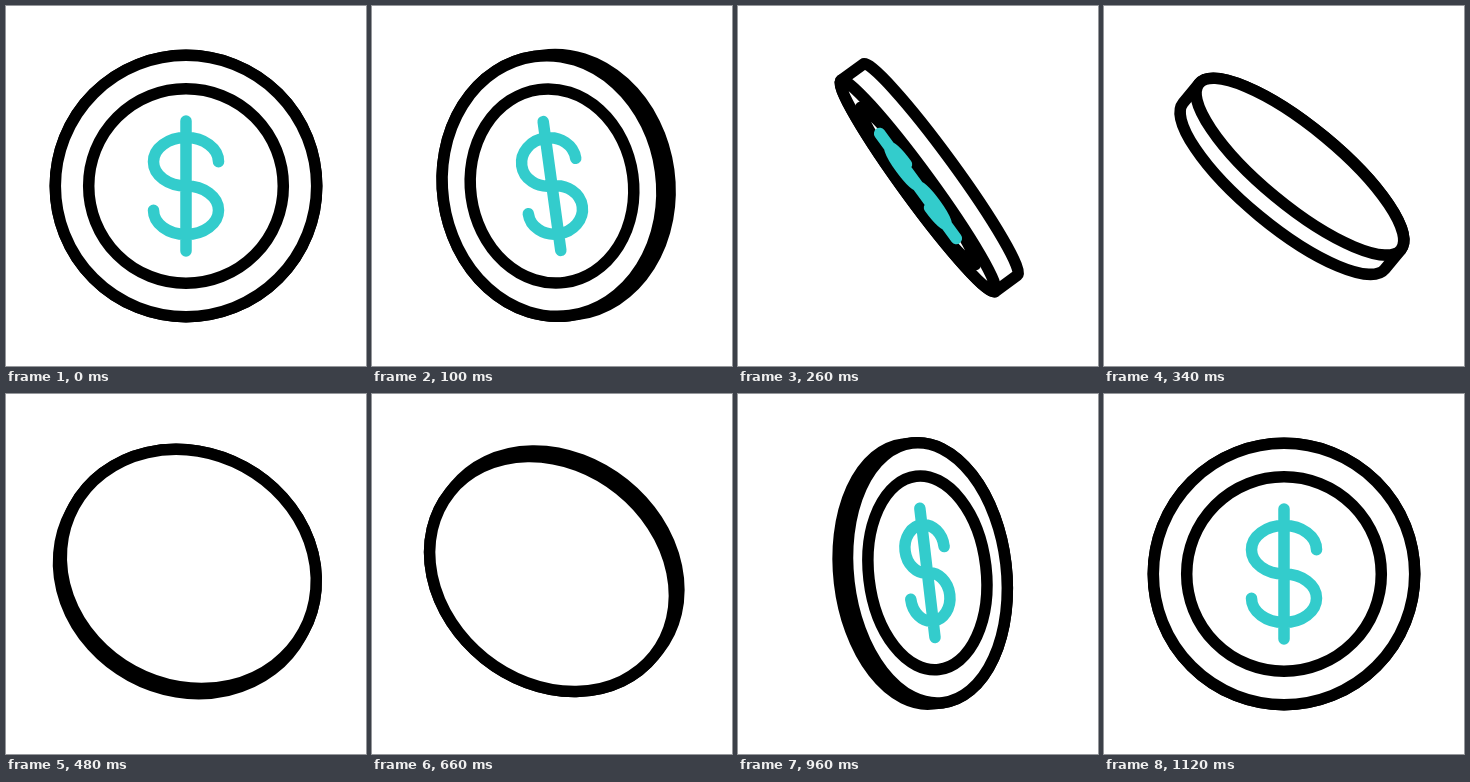
An HTML page with a canvas for the animation above (1400 ms loop, 360 px wide and 360 px high).

```html
<!DOCTYPE html>
<html lang="en">
<head>
<meta charset="utf-8">
<title>Spinning coin</title>
<style>
html, body { margin: 0; width: 100%; height: 100%; overflow: hidden; background: #fff; }
canvas { display: block; width: 360px; height: 360px; }
</style>
</head>
<body>
<canvas id="stage" width="360" height="360"></canvas>
<script>
const ctx = document.getElementById('stage').getContext('2d');
const LOOP = 1400, SPIN = 1120, STEP = 20;
const RIM = 130.7, RING = 97.3, HALF_TURN = Math.PI, QUARTER = Math.PI / 2;

// time (ms), spin correction (deg), tilt (deg), visible edge (px)
const keys = [
  [0, 0, 0, 0],
  [180, 1.4, 20.4, 18.5],
  [280, 0, 40, 28.5],
  [340, -2, 50.5, 25],
  [560, 0, 60, 0],
  [660, 2, 51.3, 7.2],
  [820, -1, 25, 29],
  [960, -1.4, 6.7, 9.5],
  [SPIN, 0, 0, 0]
];

function slope(i, col) {
  if (i === 0 || i === keys.length - 1) return 0;
  const [a, b, c] = [keys[i - 1], keys[i], keys[i + 1]];
  const before = b[0] - a[0], after = c[0] - b[0];
  return ((b[col] - a[col]) / before * after + (c[col] - b[col]) / after * before) / (before + after);
}

// Cubic Hermite through the keys
function sample(t, col) {
  let i = 0;
  while (i < keys.length - 2 && t >= keys[i + 1][0]) i++;
  const a = keys[i], b = keys[i + 1], span = b[0] - a[0];
  const u = (t - a[0]) / span, v = 1 - u;
  return v * v * (1 + 2 * u) * a[col] + u * u * (3 - 2 * u) * b[col]
    + span * u * v * (v * slope(i, col) - u * slope(i + 1, col));
}

function paint(color, fill) {
  ctx.strokeStyle = color;
  if (fill) ctx.fill();
  ctx.stroke();
}

function disc(x, radius, squash) {
  ctx.beginPath();
  ctx.ellipse(x, 0, radius * squash, radius, 0, 0, 2 * HALF_TURN);
  paint('#000', true);
}

function body(edge, squash) {
  const rx = RIM * squash;
  ctx.beginPath();
  ctx.ellipse(edge, 0, rx, RIM, 0, -QUARTER, QUARTER);
  ctx.ellipse(0, 0, rx, RIM, 0, QUARTER, 3 * QUARTER);
  ctx.closePath();
  paint('#000', true);
}

function dollar(x, squash) {
  const rx = 32.5 * squash;
  ctx.beginPath();
  ctx.moveTo(x, -65);
  ctx.lineTo(x, 65);
  ctx.moveTo(x + rx, -25);
  ctx.ellipse(x, -24.2, rx, 24.2, 0, 0, QUARTER, true);
  ctx.ellipse(x, 24.2, rx, 24.2, 0, -QUARTER, HALF_TURN);
  paint('#33cccc', false);
}

function draw(t) {
  const angle = (360 * t / SPIN + sample(t, 1)) * HALF_TURN / 180;
  const edge = Math.max(0, sample(t, 3));
  const facing = Math.cos(angle) > 0;
  const squash = Math.abs(Math.cos(angle));
  const nearX = facing === (t < SPIN / 2) ? 0 : edge;

  ctx.setTransform(1, 0, 0, 1, 0, 0);
  ctx.fillStyle = '#fff';
  ctx.fillRect(0, 0, 360, 360);
  ctx.translate(180, 180);
  ctx.rotate(-sample(t, 2) * HALF_TURN / 180);
  ctx.lineWidth = 11.5;
  ctx.lineCap = ctx.lineJoin = 'round';

  body(edge, squash);
  disc(nearX, RIM, squash);
  if (facing) {
    disc(nearX, RING, squash);
    dollar(nearX, squash);
  }
}

function tick() {
  const t = performance.now() % LOOP;
  draw(Math.min(SPIN, Math.floor(t / STEP) * STEP));
  requestAnimationFrame(tick);
}
tick();
</script>
</body>
</html>
```
